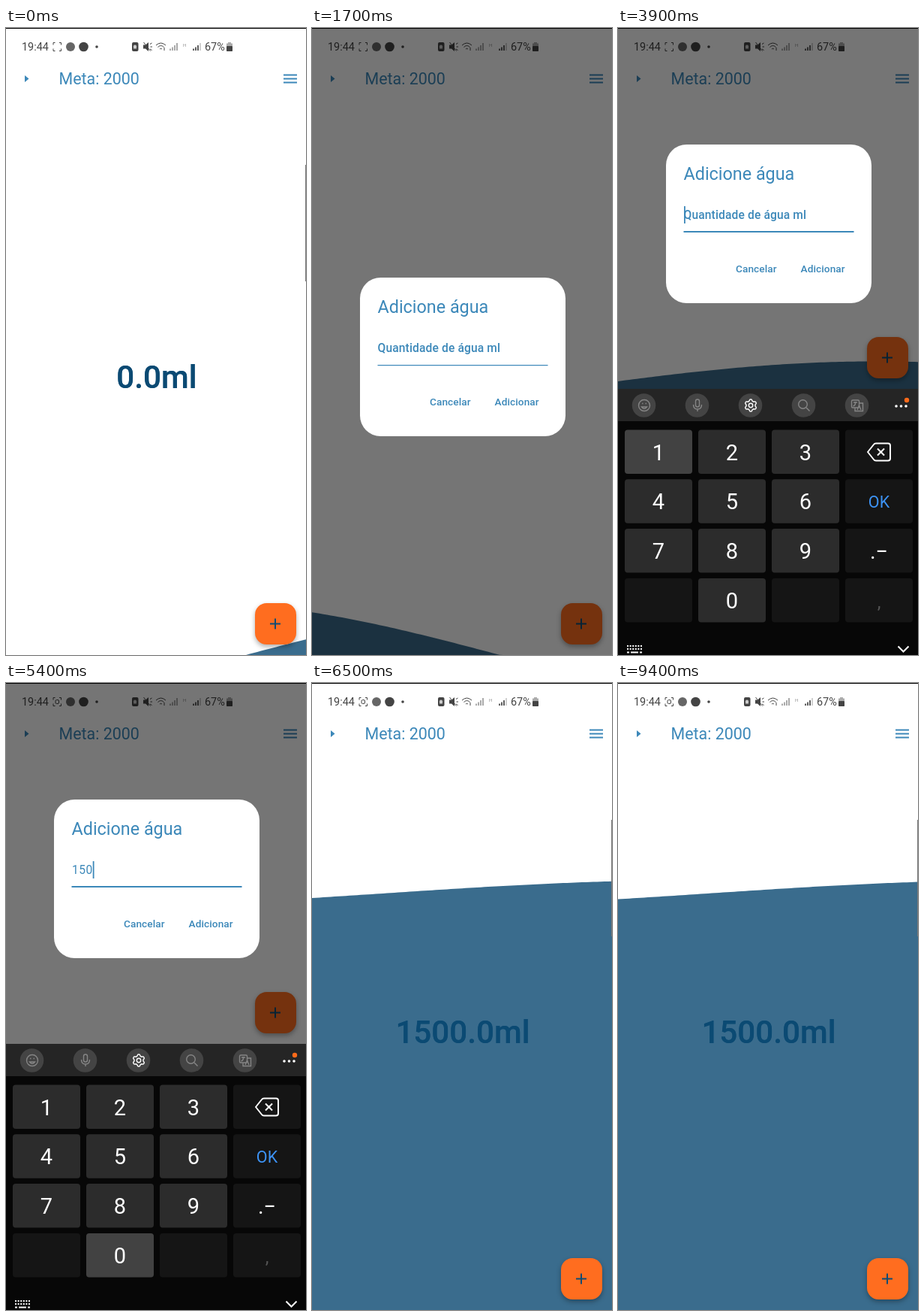
Animation of 400x834 px, one loop 9500 ms. Source, as an HTML page:

```html
<!DOCTYPE html>
<html lang="pt">
<head>
<meta charset="utf-8">
<style>
  html, body { margin: 0; width: 400px; height: 834px; overflow: hidden; background: #fff; }
  svg { display: block; font-family: Roboto, sans-serif; }
  .line { fill: none; stroke: currentColor; }
  .mid { text-anchor: middle; }
  .medium { font-weight: 500; }
</style>
</head>
<body>
<svg width="400" height="834" viewBox="0 0 400 834">
  <g id="page">
    <text id="total" class="mid medium" x="201" font-size="42.2" fill="#0b4a73"></text>
    <path id="water" fill="#0f4c75" fill-opacity=".82"/>
    <text id="totalOver" class="mid medium" x="201" font-size="42.2" fill="#0b4a73"></text>

    <g color="#3c88b9" stroke-width="2">
      <path d="M25 63l5.5 4.5-5.5 4.5z" fill="currentColor"/>
      <text x="70.5" y="74.5" font-size="21.4" fill="currentColor">Meta: 2000</text>
      <path class="line" d="M370 62.5h18M370 67.5h18M370 72.5h18"/>
    </g>

    <g font-size="14.4" fill="#444" color="#444">
      <text x="21" y="29.5">19:44</text>
      <path class="line" d="M65.500 19.500h-2.500v3M71 19.500h2.500v3M65.500 30.500h-2.500v-3M71 30.500h2.500v-3"/>
      <rect id="capture" class="line" x="66" y="22.500" width="4.500" height="5" rx="1.500"/>
      <circle cx="86" cy="25" r="6" fill="#666"/>
      <circle cx="103.500" cy="25" r="6.300"/>
      <circle cx="121" cy="25" r="1.800"/>
      <rect x="168" y="19" width="8.500" height="12" rx="2"/>
      <path d="M170 25.500a2.200 2.200 0 1 1 4 0v2h-4z" fill="#ccc"/>
      <path d="M183 22.500h3l4-3.500v12l-4-3.500h-3z"/>
      <path class="line" d="M183.500 19l9 11.500M192 21.500l2.500-1.500M192.500 25h2.500M192 28l2.500 1.500"/>
      <path class="line" d="M200 23q6.500-6 13 0M202.500 25.500q4-4 8 0M205 28q1.500-1.500 3 0M211 26v4"/>
      <path class="line" stroke-width="1.500" d="M219 30v-2.500M222 30v-4.500M225 30v-7M228 30v-10" opacity=".6"/>
      <text x="236" y="25" font-size="6" opacity=".6">H</text>
      <path class="line" stroke-width="1.700" d="M250 30v-2.500M253 30v-4.500M256 30v-7"/>
      <path class="line" d="M259 30v-10" opacity=".5"/>
      <text x="265" y="29.500">67%</text>
      <path d="M296 19h4v1.500h2v10.500h-8v-10.500h2z" opacity=".45"/>
      <rect x="294" y="24" width="8" height="7" rx="1"/>
    </g>

    <g id="fab">
      <rect x="332" y="765" width="55" height="55" rx="15.500" fill="#ff6d1f"
        style="filter:drop-shadow(0 3px 3px rgba(0,0,0,.32))"/>
      <path class="line" color="#0f4c75" stroke-width="2" d="M352 792.500h14M359 785.500v14"/>
    </g>
  </g>

  <rect id="dim" width="400" height="834"/>
  <rect id="handle" x="399" y="182" width="1" height="155" fill="#777"/>
  <rect width="400" height="1"/>

  <g id="dialog" fill="#3c88b9" color="#3c88b9">
    <rect x="64" width="274" height="211" rx="27.500" fill="#fff"/>
    <text x="87.500" y="47" font-size="23.360">Adicione água</text>
    <text id="hint" class="medium" x="87.500" y="99" font-size="15.570" letter-spacing=".146">Quantidade de água ml</text>
    <text id="entry" x="88" y="99" font-size="15.570" letter-spacing=".490"></text>
    <rect id="cursor" y="82" width="1.800" height="23"/>
    <rect id="underline" x="87.500" width="227"/>
    <g class="medium" font-size="13.620" letter-spacing=".1">
      <text x="157" y="169.500">Cancelar</text>
      <text x="243.500" y="169.500">Adicionar</text>
    </g>
  </g>

  <g id="keyboard">
    <rect y="480" width="400" height="360" fill="#070707"/>
    <rect y="480" width="400" height="43" fill="#252525"/>
    <g id="tools" fill="#444"></g>
    <g class="line" color="#858585" stroke-width="1.400">
      <circle cx="35" cy="502" r="7.500"/>
      <path d="M31.500 504q3.500 4.500 7 0zM32 499.500h1.500M36.500 499.500h1.500"/>
      <rect x="103.500" y="494" width="5" height="10" rx="2.500"/>
      <path d="M100.500 501q0 6 5.500 6t5.500-6M106 507v3"/>
      <circle cx="246.500" cy="500.500" r="5.800"/><path d="M251 505l4.500 4.500"/>
      <rect x="311.500" y="495" width="10" height="10" rx="1.500"/>
      <path d="M322 499h4.500v10.500h-10.500v-4M314 498h5M316.500 497v2q0 3-3 4M319 508l2.500-6 2.500 6"/>
      <g color="#fff" stroke="#fff">
        <path id="gear"/><circle cx="177" cy="502" r="2.700"/>
      </g>
    </g>
    <path d="M371 503h.01M377.500 503h.01M384 503h.01" stroke="#fff" stroke-width="3.600" stroke-linecap="round"/>
    <circle cx="385" cy="495" r="3.200" fill="#ff6a1a"/>
    <g id="keys" class="mid" font-size="29" fill="#fff"></g>
    <path class="line" color="#fff" stroke-width="2" stroke-linejoin="round"
      d="M333 564l8-10q1-1.500 3-1.500h16q3 0 3 3v17q0 3-3 3h-16q-2 0-3-1.500zM346 559.500l9 9M355 559.500l-9 9"/>
  </g>
  <g id="nav" class="line" color="#fff" stroke-width="2">
    <path d="M12 822h20M12 826h20" stroke-dasharray="2 1.600"/>
    <path d="M12 830.500h3M17 830.500h10M29 830.500h3"/>
    <path d="M373.500 822.500l7 7 7-7"/>
  </g>
</svg>
<script>
const LOOP = 9.5, HEIGHT = 834, BAR = 95, KEYBOARD = 354, GOAL = 2000;
const TYPED = '1500', TYPE_START = 3.98, TYPE_STEP = .5, CLOSE = 6.05;
const $ = id => document.getElementById(id);
const set = (id, attrs) => { for (const k in attrs) $(id).setAttribute(k, attrs[k]); };
const ramp = (t, start, length) => Math.min(1, Math.max(0, (t - start) / length));
const easeOut = u => 1 - (1 - u) ** 3;
const opened = t => easeOut(ramp(t, 1.75, .5)) - easeOut(ramp(t, CLOSE, .4));

// Wave phase over time, roughly one turn every three seconds
const PHASE = [[0, -1.2], [.8, .17], [2.1, 3.1], [3.9, 6.56], [6.5, 12.2], [9.5, 18.6]];
function phaseAt(t) {
  const i = PHASE.findIndex(p => p[0] > t), [t0, a] = PHASE[i - 1], [t1, b] = PHASE[i];
  return a + (b - a) * (t - t0) / (t1 - t0);
}

function buildKeyboard() {
  $('tools').innerHTML = [35, 106, 177, 248, 319]
    .map(x => `<circle cx="${x - .5}" cy="502" r="15.800"/>`).join('');
  const labels = ['1', '2', '3', '', '4', '5', '6', 'OK', '7', '8', '9', '.−', '', '0', '', ','];
  $('keys').innerHTML = labels.map((label, i) => {
    const x = 9 + i % 4 * 98, y = 534.5 + Math.floor(i / 4) * 65.8, digit = /\d/.test(label);
    const style = { OK: 'font-size="21.500" fill="#3d93f5"', ',': 'font-size="24" fill="#555"' }[label] || '';
    return `<rect ${digit ? `id="key${label}"` : ''} x="${x}" y="${y}" width="90" height="58.500" rx="4" fill="${digit ? '#2c2c2c' : '#151515'}"/>
      <text x="${x + 45}" y="${y + (label === 'OK' ? 37.5 : 40)}" ${style}>${label}</text>`;
  }).join('');
  const teeth = Array.from({ length: 48 }, (_, i) => {
    const a = i * Math.PI / 24, r = 7 + Math.tanh(3 * Math.cos(6 * a));
    return `${177 + r * Math.sin(a)} ${502 - r * Math.cos(a)}`;
  });
  set('gear', { d: `M${teeth.join('L')}Z` });
}

function drawPage(t) {
  const bottom = HEIGHT - KEYBOARD * opened(t - .02), room = bottom - BAR;
  const amount = t < CLOSE + .05 ? 0 : +TYPED, part = amount / GOAL;
  const level = bottom - part * room, height = .095 * room * (1 - part), phase = phaseAt(t);
  let d = `M0 ${bottom + 300}`;
  for (let x = 0; x <= 400; x += 5) {
    const y = level - height * Math.sin(phase + .00375 * x);
    d += `L${x} ${Math.min(y, bottom)}`;
  }
  set('water', { d: `${d}L400 ${bottom + 300}Z` });
  for (const id of ['total', 'totalOver']) {
    $(id).textContent = amount.toFixed(1) + 'ml';
    set(id, { y: BAR + room / 2 + 14.5 });
  }
  set('fab', { transform: `translate(0 ${bottom - HEIGHT})` });
  set('capture', { opacity: t > 4.5 ? 1 : 0 });
}

function drawDialog(t) {
  const shown = ramp(t, .45, .15) - ramp(t, CLOSE, .15);
  const focused = t > 2.15, count = Math.min(4, Math.max(0, Math.floor((t - TYPE_START) / TYPE_STEP) + 1));
  const blinkStart = count ? TYPE_START + (count - 1) * TYPE_STEP : 1.5;
  set('dim', { opacity: .54 * shown });
  set('handle', { opacity: 1 - shown });
  set('dialog', { opacity: shown, transform: `translate(0 ${332 - KEYBOARD / 2 * opened(Math.min(t, CLOSE) - .14)})` });
  set('hint', { opacity: count ? 0 : 1 });
  $('entry').textContent = TYPED.slice(0, count);
  set('cursor', { x: 88 + 9.24 * count, opacity: focused && (t - blinkStart) % 1 < .5 ? 1 : 0 });
  set('underline', { y: focused ? 115 : 116, height: focused ? 2 : 1.2 });
}

function drawKeyboard(t) {
  const open = opened(t);
  set('keyboard', { transform: `translate(0 ${KEYBOARD * (1 - open)})` });
  set('nav', { opacity: ramp(open, .3, .5) });
  for (const digit of new Set(TYPED)) {
    const pressed = [...TYPED].some((c, i) => {
      const release = TYPE_START + i * TYPE_STEP;
      return c === digit && t > release - .15 && t < release;
    });
    set('key' + digit, { fill: pressed ? '#424242' : '#2c2c2c' });
  }
}

function frame() {
  const t = performance.now() / 1000 % LOOP;
  drawPage(t);
  drawDialog(t);
  drawKeyboard(t);
  requestAnimationFrame(frame);
}
buildKeyboard();
frame();
</script>
</body>
</html>
```
